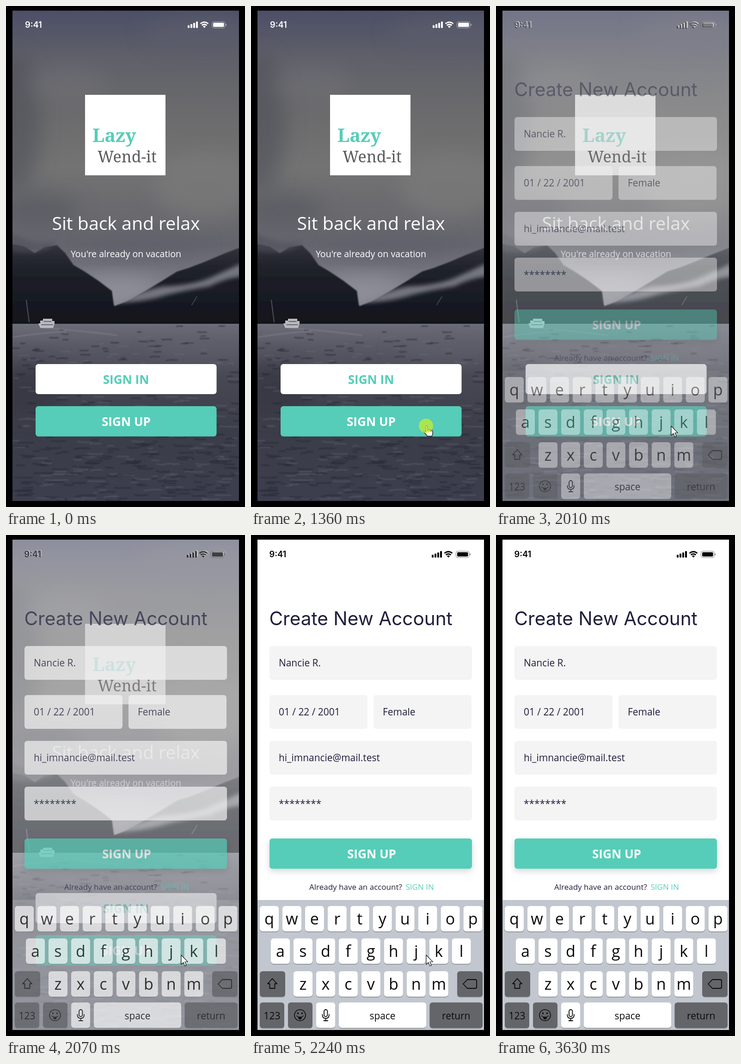
These frames come from a looping animation (517x1083 px, 4330 ms). An HTML page:

```html
<!DOCTYPE html>
<html lang="en">
<head>
<meta charset="utf-8">
<title>Sign up flow</title>
<style>
html, body { margin: 0; width: 100%; height: 100%; overflow: hidden; background: #000; }
svg { display: block; width: 100vw; height: 100vh; }
text { font-family: "Open Sans", sans-serif; white-space: pre; }
.ui { font-family: Inter, sans-serif; }
.serif { font-family: "Noto Serif", serif; }
.mid { text-anchor: middle; }
.bold { font-weight: 700; }
</style>
</head>
<body>
<svg id="stage" viewBox="0 0 517 1083">
  <defs>
    <clipPath id="screen"><rect x="14" y="10" width="490" height="1060"/></clipPath>
    <linearGradient id="sky" gradientUnits="userSpaceOnUse" x1="0" y1="10" x2="0" y2="686">
      <stop offset="0" stop-color="#4c4f67"/>
      <stop offset=".15" stop-color="#5f6069"/>
      <stop offset=".31" stop-color="#6a6a6c"/>
      <stop offset=".5" stop-color="#737373"/>
      <stop offset=".62" stop-color="#6b6b6f"/>
      <stop offset=".75" stop-color="#64646d"/>
      <stop offset=".92" stop-color="#868690"/>
      <stop offset="1" stop-color="#7a7a84"/>
    </linearGradient>
    <linearGradient id="rock" x1="0" y1="0" x2="0" y2="1">
      <stop offset="0" stop-color="#34353d"/>
      <stop offset=".3" stop-color="#20222a"/>
      <stop offset="1" stop-color="#11141c"/>
    </linearGradient>
    <linearGradient id="sea" x1="0" y1="0" x2="0" y2="1">
      <stop offset="0" stop-color="#6c6d79"/>
      <stop offset=".12" stop-color="#595a66"/>
      <stop offset=".3" stop-color="#474853"/>
      <stop offset=".6" stop-color="#3b3d49"/>
      <stop offset="1" stop-color="#3c3e4d"/>
    </linearGradient>
    <filter id="soft" x="-50%" y="-50%" width="200%" height="200%"><feGaussianBlur stdDeviation="22"/></filter>
    <filter id="mist" x="-20%" y="-50%" width="140%" height="200%"><feGaussianBlur stdDeviation="5"/></filter>
    <filter id="edge"><feGaussianBlur stdDeviation="1.2"/></filter>
    <filter id="drop" x="-10%" y="-40%" width="120%" height="200%">
      <feDropShadow dx="0" dy="5" stdDeviation="7" flood-color="#000" flood-opacity=".16"/>
    </filter>
  </defs>
  <rect width="517" height="1083"/>
  <g clip-path="url(#screen)">
    <rect x="14" y="10" width="490" height="1060" fill="#fff"/>
    <g id="photo"></g>
    <g id="welcome"></g>
    <g id="form"></g>
  </g>
  <g id="cursor">
    <path id="arrow" d="M0 0V20.5L4.7 16 8 23.6 11.2 22.2 8 14.8H14.5Z" fill="#fff" stroke="#111" stroke-width="1.1" stroke-linejoin="round"/>
    <path id="hand" d="M-1.8 1.8Q-1.6 0 0 0 1.8 0 1.8 1.8V8.2Q5 7.2 5.6 9.2 8.6 8.2 9.3 10.3 13 9.8 13 13V17Q13 20 11 22.8H1.4Q-1.5 18-6 14.2-6.4 11.2-3.6 12L-1.8 13.6ZM5.6 9.2V12.5M9.3 10.3V13.2M1.8 8V12" fill="#fffdf4" stroke="#111" stroke-width="1.3" stroke-linejoin="round"/>
  </g>
  <circle id="tap" cx="378.5" cy="907.5" fill="#c8ec30"/>
</svg>
<script>
const TEAL = '#55cdb8', INK = '#1f1e3c', LOOP = 4330;
const $ = id => document.getElementById(id);

const rect = (x, y, w, h, fill, r = 6, more = '') =>
  `<rect x="${x}" y="${y}" width="${w}" height="${h}" rx="${r}" fill="${fill}" ${more}/>`;
const text = (x, y, size, fill, str, cls = '') =>
  `<text x="${x}" y="${y}" font-size="${size}" fill="${fill}" class="${cls}">${str}</text>`;
const shape = (d, fill, more = '') => `<path d="${d}" fill="${fill}" ${more}/>`;
const line = (d, color, width, more = '') =>
  shape(d, 'none', `stroke="${color}" stroke-width="${width}" stroke-linecap="round" stroke-linejoin="round" ${more}`);

let seed = 7;
const rand = () => (seed = seed * 16807 % 2147483647) / 2147483647;

// Signal, wifi and battery; the origin is the lower left of the signal bars
function status(x, y, color) {
  const bars = [6, 8.5, 11, 14].map((h, i) => rect(i * 6, -h, 4, h, color, 1.2)).join('');
  const wifi = line('M27.5-9.2Q36-16.2 44.5-9.2M30.6-5.6Q36-9.9 41.4-5.6', color, 2.7, 'style="stroke-linecap:butt"')
    + shape('M36 0L32.8-3.2Q36-5.8 39.2-3.2Z', color);
  const battery = rect(52.5, -13.8, 28.5, 14, 'none', 4, `stroke="${color}" stroke-opacity=".5"`)
    + rect(55, -11.4, 23.5, 9.2, color, 2) + rect(82.3, -9, 1.6, 4.6, color, .8, 'opacity=".5"');
  return `<g transform="translate(${x} ${y})">${bars}${wifi}${battery}</g>`;
}

function ripples(count, color, alpha) {
  let d = '';
  for (let i = 0; i < count; i++) {
    const k = Math.pow(rand(), .8), y = 692 + 378 * k, x = 10 + 490 * rand();
    const w = 8 + (12 + 22 * k) * rand(), b = (rand() - .5) * (3 + 7 * k);
    d += `M${x.toFixed(1)} ${y.toFixed(1)}q${(w / 2).toFixed(1)} ${b.toFixed(1)} ${w.toFixed(1)} ${(b / 3).toFixed(1)}`;
  }
  return line(d, color, 2.2, `opacity="${alpha}" filter="url(#edge)"`);
}

function photo() {
  const cloud = (x, y, rx, ry, c, o) =>
    `<ellipse cx="${x}" cy="${y}" rx="${rx}" ry="${ry}" fill="${c}" opacity="${o}" filter="url(#soft)"/>`;
  return rect(14, 10, 490, 680, 'url(#sky)', 0)
    + cloud(20, 250, 55, 150, '#4e4f59', .6)
    + cloud(430, 60, 130, 40, '#5b5d6c', .7)
    + cloud(130, 170, 90, 40, '#74747a', .4)
    + cloud(430, 390, 110, 70, '#7a7a7a', .7)
    + cloud(70, 440, 90, 35, '#55565f', .6)
    + cloud(300, 520, 130, 25, '#5c5d67', .5)
    + cloud(240, 610, 90, 24, '#9898a2', .7)
    + `<g filter="url(#edge)">`
    + shape('M0 512L40 520 62 534 84 521 110 517 128 534 146 560 170 574 200 594 229 616 233 645 250 688H0Z', 'url(#rock)')
    + shape('M520 517L470 536 430 553 396 566 370 574 338 594 300 617 262 638 234 649 244 688H520Z', 'url(#rock)')
    + '</g>'
    + shape('M10 490Q60 520 110 508L96 524Q60 540 10 530Z', '#4e4f58', 'opacity=".55" filter="url(#mist)"')
    + shape('M238 642Q290 616 340 606 400 604 440 588 480 570 510 556V584Q470 590 440 606 390 614 350 624 300 640 238 642Z', '#84858f', 'opacity=".85" filter="url(#mist)"')
    + line('M44 636Q47 660 50 683', '#5d5e68', 2, 'opacity=".8"')
    + line('M413 628L402 646', '#5d5e68', 2, 'opacity=".6"')
    + rect(14, 687, 490, 385, 'url(#sea)', 0)
    + cloud(50, 830, 80, 60, '#31323d', .6)
    + cloud(420, 740, 110, 25, '#63646f', .5)
    + ripples(260, '#22242f', .6)
    + ripples(170, '#70717f', .42)
    + line('M16 716Q60 708 130 703M80 696Q150 700 240 712', '#90919b', 2, 'opacity=".5" filter="url(#edge)"')
    + shape('M70 686H74V680H80V676H100V681H105V686L102 696H74Z', '#b9b9bf')
    + line('M77 689H101M82 682H98', '#4a4b55', 1.6);
}

function welcome() {
  return text(41, 47, 18.3, '#fff', '9:41', 'ui" font-weight="600')
    + status(393, 47.5, '#fff')
    + rect(171, 192, 174, 174, '#fff', 0)
    + text(187, 294, 40, TEAL, 'Lazy', 'serif bold')
    + text(198, 338, 34, '#5b5b5f', 'Wend-it', 'serif')
    + text(259.5, 484, 39.2, '#fff', 'Sit back and relax', 'mid')
    + text(259.5, 543, 19.6, '#fff', "You're already on vacation", 'mid')
    + rect(64, 774, 391.5, 65, '#fff')
    + text(259.5, 816.5, 26.1, TEAL, 'SIGN IN', 'mid bold')
    + rect(64, 865, 391.5, 65.5, TEAL)
    + text(260, 908, 26.1, '#fff', 'SIGN UP', 'mid bold');
}

function keyboard() {
  const DARK = '#636569';
  const key = (x, y, w, fill, label = '', size = 34, base = 40) =>
    rect(x, y + 1.4, w, 55, '#85888d') + rect(x, y, w, 55, fill)
    + text(x + w / 2, y + base, size, '#0a0a0a', label, 'mid');
  const row = (str, x, y) => [...str].map((c, i) => key(x + i * 48.95, y, 41, '#fff', c)).join('');
  return rect(14, 789, 490, 282, '#c2c7cf', 0, 'id="tray"')
    + row('qwertyuiop', 19, 802) + row('asdfghjkl', 43, 872) + row('zxcvbnm', 92, 943)
    + key(19, 943, 55, DARK) + key(446, 943, 55, DARK)
    + key(19, 1010.5, 53, DARK, '123', 20.9, 36.5)
    + key(80, 1010.5, 53, DARK)
    + key(141, 1010.5, 41, '#fff')
    + key(190, 1010.5, 189, '#fff', 'space', 20.9, 36)
    + key(386.5, 1010.5, 114.5, DARK, 'return', 20.9, 36)
    + line('M46 959L56 970H51.5V980H40.5V970H36Z', '#0a0a0a', 1.8)
    + line('M459 970.5L468 961H485Q488 961 488 964V977Q488 980 485 980H468Z', '#0a0a0a', 1.8)
    + '<circle cx="106" cy="1038" r="12" fill="none" stroke="#0a0a0a" stroke-width="1.6"/>'
    + '<circle cx="101.5" cy="1034" r="1.7"/><circle cx="110.5" cy="1034" r="1.7"/>'
    + line('M98.5 1039.5Q106 1045 113.5 1039.5', '#0a0a0a', 1.5)
    + shape('M102 1042Q106 1043.5 110 1042 110.5 1046 106 1047.5 101.5 1046 102 1042Z', '#0a0a0a')
    + rect(158, 1026, 7.4, 15, 'none', 3.7, 'stroke="#0a0a0a" stroke-width="1.8"')
    + line('M154.3 1036.5Q154.3 1045 161.7 1045 169 1045 169 1036.5M161.7 1045V1050M157.5 1050H166', '#0a0a0a', 1.8);
}

function form() {
  const field = (x, y, w, str) => rect(x, y, w, 73, '#f4f4f4') + text(x + 20, y + 44, 20.9, INK, str);
  return text(39.5, 48.3, 18.3, '#000', '9:41', 'ui" font-weight="600')
    + status(391, 48.7, '#000')
    + text(39.5, 194.5, 40.5, INK, 'Create New Account', 'ui')
    + field(40, 240, 438, 'Nancie R.')
    + field(40, 346, 212, '01 / 22 / 2001')
    + field(265, 346, 212, 'Female')
    + field(40, 445, 438, 'hi_imnancie@mail.test')
    + field(40, 544, 438, '********')
    + rect(40, 656, 438, 65.5, TEAL, 6, 'filter="url(#drop)"')
    + text(261, 699, 26.1, '#fff', 'SIGN UP', 'mid bold')
    + text(126, 766.5, 17, INK, 'Already have an account?')
    + text(334.5, 766.5, 17, TEAL, 'SIGN IN')
    + keyboard();
}

$('photo').innerHTML = photo();
$('welcome').innerHTML = welcome();
$('form').innerHTML = form();

const clamp = v => Math.max(0, Math.min(1, v));
const span = (t, a, b) => clamp((t - a) / (b - a));
const smooth = u => u * u * (3 - 2 * u);
const quad = u => u < .5 ? 2 * u * u : 1 - 2 * (1 - u) * (1 - u);

// Pointer stops: time, x, y
const stops = [
  [740, 398, 975], [1060, 380, 907], [1800, 380, 907], [1820, 379, 908], [2590, 379, 908],
  [2760, 372, 764], [2940, 422, 987], [3080, 439, 1023], [3150, 439, 1023],
  [3310, 453, 1079], [3530, 453, 1079], [3630, 453, 1085]
];

function pointer(t) {
  const i = stops.findIndex(s => s[0] > t);
  if (i < 1) return null;
  const [a, b] = [stops[i - 1], stops[i]], u = smooth(span(t, a[0], b[0]));
  return [a[1] + (b[1] - a[1]) * u, a[2] + (b[2] - a[2]) * u];
}

const show = (id, on) => $(id).setAttribute('visibility', on ? 'visible' : 'hidden');
const fade = (id, v) => $(id).setAttribute('opacity', v.toFixed(3));

function draw(t) {
  const u = span(t, 1810, 2240), white = u * u;
  fade('photo', 1 - white);
  fade('welcome', Math.pow(1 - white, 1.4));
  fade('form', quad(u));
  fade('tray', white);

  const p = pointer(t), over = p && t < 1820 && p[1] < 930;
  show('arrow', p && !over);
  show('hand', over);
  if (p) $('cursor').setAttribute('transform', `translate(${p[0].toFixed(2)} ${p[1].toFixed(2)})`);

  const tap = span(t, 1400, 1610);
  show('tap', t >= 1360 && t < 1610);
  $('tap').setAttribute('r', 15.5 * (1 + tap));
  fade('tap', .74 * (1 - tap));
}

const start = performance.now();
function tick() {
  draw((performance.now() - start) % LOOP);
  requestAnimationFrame(tick);
}
tick();
</script>
</body>
</html>
```
